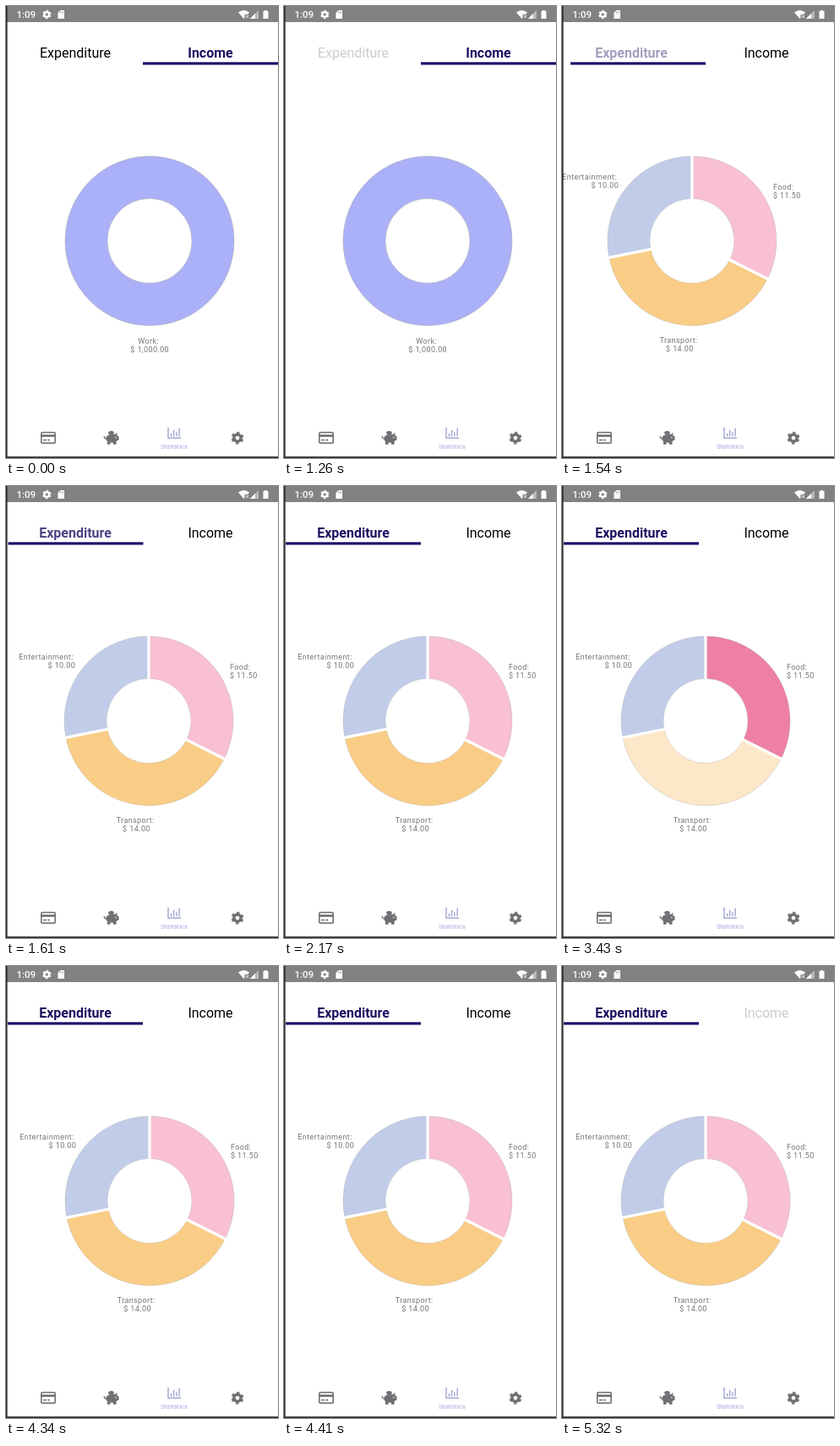
Write an HTML page that moves like this. It is 322 px wide and 534 px high and loops after 5.39 s.

```html
<!DOCTYPE html>
<html lang="en">
<head>
<meta charset="utf-8">
<title>Statistics tabs</title>
<style>
  html, body { margin: 0; width: 100%; height: 100%; overflow: hidden; background: #fff; }
  svg { display: block; }
  text { font-family: Roboto, "Liberation Sans", sans-serif; }
  .tab { font-size: 16px; text-anchor: middle; }
  .on { font-weight: 700; fill: #1d1160; }
  .label { font-size: 9px; letter-spacing: .4px; fill: #757575; }
  .mid { text-anchor: middle; }
  .end { text-anchor: end; }
  .ring { fill: none; stroke: #999; stroke-opacity: .45; }
  .gap { stroke: #fff; stroke-width: 3.2; }
</style>
</head>
<body>
<svg width="322" height="534" viewBox="0 0 322 534">
  <defs>
    <g id="gear" fill="none">
      <circle r="4.1" stroke-width="3.4"/>
      <circle r="6.2" stroke-width="2.4" stroke-dasharray="3.2 3.293" stroke-dashoffset="-1.646"/>
    </g>
  </defs>
  <rect width="322" height="534" fill="#fff"/>

  <g id="spending">
    <g id="slices"></g>
    <text class="label" x="266" y="217">Food:</text>
    <text class="label" x="266" y="227">$ 11.50</text>
    <text class="label mid" x="154.2" y="397.5">Transport:</text>
    <text class="label mid" x="155.5" y="407.5">$ 14.00</text>
    <text class="label end" x="80.8" y="205">Entertainment:</text>
    <text class="label end" x="83.3" y="214.5">$ 10.00</text>
  </g>
  <g id="earning">
    <circle cx="170" cy="277.5" r="75" fill="none" stroke="#abb1f8" stroke-width="50"/>
    <circle class="ring" cx="170" cy="277.5" r="100"/>
    <circle class="ring" cx="170" cy="277.5" r="50"/>
    <text class="label mid" x="168.7" y="398.5">Work:</text>
    <text class="label mid" x="170.2" y="408.5">$ 1,000.00</text>
  </g>

  <text class="tab" id="left" x="82" y="60.5">Expenditure</text>
  <text class="tab" id="right" x="242" y="60.5">Income</text>
  <rect id="bar" y="66.3" width="160" height="3.2" fill="#1d1168"/>

  <!-- status bar -->
  <rect width="322" height="19" fill="#828282"/>
  <g fill="#fff">
    <text x="12.5" y="14" font-size="11.5" font-weight="500">1:09</text>
    <use href="#gear" transform="translate(48.3 10) scale(.7)" stroke="#fff"/>
    <path d="M64.5 5H69v10h-7.500V8z"/>
    <path d="M64.500 6.500v2M66 6.500v2M67.500 6.500v2" stroke="#828282" stroke-width=".7"/>
    <path d="M275 7.500Q281.500 2.500 288 7.500L286 10H282.500V14L281.500 15Z"/>
    <path d="M284 11l3 3m0-3l-3 3" stroke="#fff"/>
    <path d="M289 15L299 5V15Z" opacity=".45"/>
    <path d="M289 15L295 9V15Z"/>
    <path d="M304.500 6H306V5h3v1h1.500v9h-6z"/>
  </g>

  <!-- bottom navigation -->
  <g fill="#707074" stroke="#707074">
    <rect x="41.800" y="503.800" width="16.400" height="12.600" rx="1.200" fill="none" stroke-width="1.600"/>
    <path d="M42 507.700H58" stroke-width="2.600"/>
    <path d="M44 512.800h4m1.200 0h2.800" stroke-width="1.500"/>
    <g stroke="none">
      <ellipse cx="125.500" cy="511" rx="7.300" ry="5"/>
      <path d="M120 512h3.500v6H120zM127 512h3.500v6H127zM129 508h4.500v5H129zM127.500 507L131.500 504V510Z"/>
      <ellipse cx="124.500" cy="504.300" rx="3.300" ry="2.300"/>
      <circle cx="129.800" cy="509.800" r=".8" fill="#fff"/>
    </g>
    <path d="M119 511Q115.500 511 116.500 508" fill="none" stroke-width="1.200"/>
    <use href="#gear" x="274" y="510.300"/>
  </g>
  <path d="M192 498V510.300H207M195.500 505V508.500M198.700 501V508.500M201.900 503.500V508.500M205.100 499V508.500"
        fill="none" stroke="#989dcd" stroke-width="1.300"/>
  <text class="mid" x="199" y="523" font-size="7.700" fill="#a3a8de">Statistics</text>

  <path d="M.8 0V534" stroke="#2b2b2e" stroke-width="1.600"/>
  <path d="M0 533.100H322" stroke="#2b2b2e" stroke-width="1.800"/>
</svg>
<script>
const LOOP = 5390, STEP = 70, CX = 170, CY = 277.5;
const $ = id => document.getElementById(id);

const parts = [
  { id: 'food', value: 11.5, fill: '#f9c0d4' },
  { id: 'transport', value: 14, fill: '#facd86' },
  { id: 'fun', value: 10, fill: '#c1cde8' }
];

function point(turn, r) {
  const a = turn * 2 * Math.PI;
  return `${CX + r * Math.sin(a)} ${CY - r * Math.cos(a)}`;
}

function buildSlices() {
  const total = parts.reduce((sum, p) => sum + p.value, 0);
  let from = 0, shapes = '', gaps = '';
  for (const p of parts) {
    const to = from + p.value / total;
    shapes += `<path id="${p.id}" fill="${p.fill}" d="M${point(from, 100)}A100 100 0 0 1 ${point(to, 100)}` +
      `L${point(to, 50)}A50 50 0 0 0 ${point(from, 50)}Z"/>`;
    gaps += `<path class="gap" d="M${point(from, 48)}L${point(from, 102)}"/>`;
    from = to;
  }
  const rings = [100, 50].map(r =>
    `<circle class="ring" style="stroke-opacity:.3" cx="${CX}" cy="${CY}" r="${r}"/>`).join('');
  $('slices').innerHTML = shapes + rings + gaps;
}

const clamp = x => Math.min(1, Math.max(0, x));
const easeInOut = x => x < .5 ? 2 * x * x : 1 - 2 * (1 - x) ** 2;
const ramp = (t, start, length) => easeInOut(clamp((t - start) / length));

function draw(t) {
  // share of the page slide still to go
  const rest = (1 - clamp((t - 1405) / 300)) ** 5;
  const onLeft = t >= 1470;
  const slide = onLeft ? rest : 1;
  $('spending').setAttribute('transform', `translate(${-320 * slide})`);
  $('earning').setAttribute('transform', `translate(${320 * (1 - slide)})`);
  $('bar').setAttribute('x', 2 + 160 * slide);

  $('left').classList.toggle('on', onLeft);
  $('right').classList.toggle('on', !onLeft);
  $('left').setAttribute('opacity', t < 1260 ? 1 : .2 + .8 * ramp(t, 1452, 250));
  $('right').setAttribute('opacity', 1 - .8 * ramp(t, 5160, 150));

  const pressed = (start, tint, base) => t >= start && t < 4270 ? tint : base;
  $('food').setAttribute('fill', pressed(3430, '#ed80a4', parts[0].fill));
  $('transport').setAttribute('fill', pressed(2590, '#fce7c8', parts[1].fill));
}

function tick() {
  draw(Math.floor(performance.now() % LOOP / STEP) * STEP);
  requestAnimationFrame(tick);
}

buildSlices();
tick();
</script>
</body>
</html>
```
